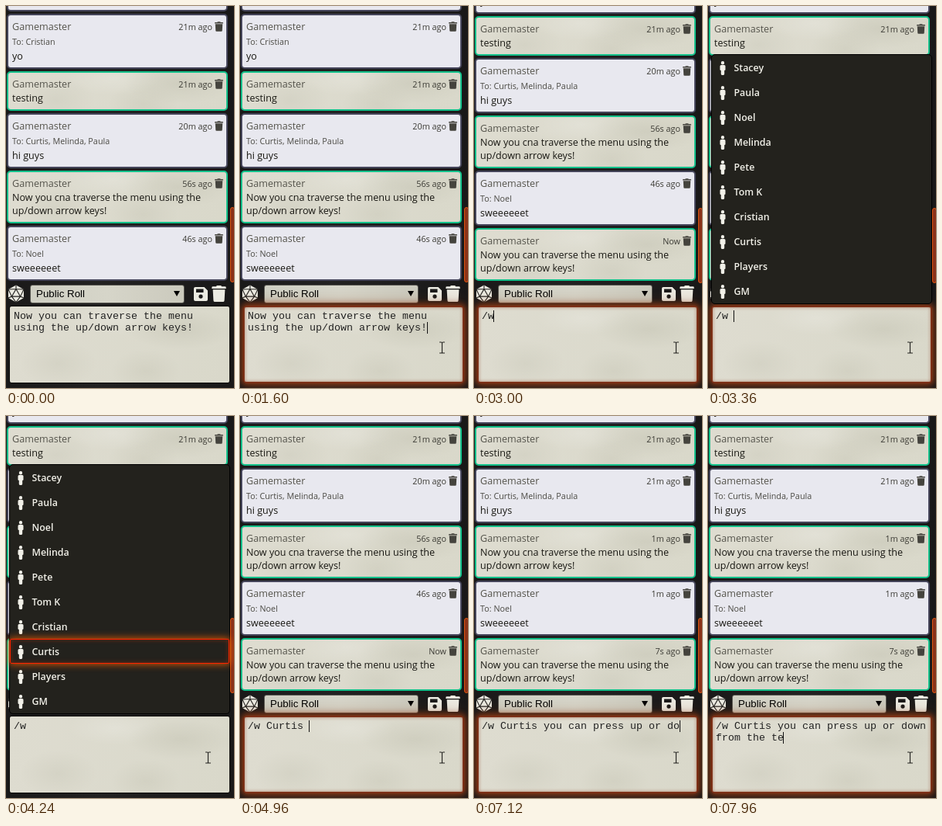
Recreate the animation shown at these times as an HTML page. Size 295 px wide and 492 px high, loop 8 s.

```html
<!DOCTYPE html>
<html lang="en">
<head>
<meta charset="utf-8">
<title>Chat whisper menu</title>
<style>
  html, body { margin: 0; width: 100%; height: 100%; overflow: hidden; background: #1c1b1b; }
  #stage { position: relative; width: 295px; height: 492px; overflow: hidden;
    background: linear-gradient(90deg, #1a1919, #222121 40%, #191818);
    font: 12.6px/17px "Open Sans", sans-serif; color: #191813; }
  #stage * { box-sizing: border-box; }
  #stage svg, .abs, .card > * { position: absolute; white-space: pre; }
  .paper { background:
    radial-gradient(ellipse 70px 26px at 78% 30%, #c6c5b588, #c6c5b500),
    radial-gradient(ellipse 50px 30px at 22% 75%, #cbcabb77, #cbcabb00),
    radial-gradient(ellipse 60px 22px at 48% 15%, #e6e5dc99, #e6e5dc00),
    radial-gradient(ellipse 45px 28px at 62% 85%, #c9c8b877, #c9c8b800),
    linear-gradient(100deg, #dedcd0, #d9d8ca); }

  #log { left: 1px; top: 0; width: 286px; height: 354px; overflow: hidden;
    display: flex; flex-direction: column; justify-content: flex-end; gap: 3px; }
  .card { position: relative; flex: none; border: 2px solid #45455a; border-radius: 5px; }
  .card.whisper { background: #e8e8ef; }
  .card.paper { border-color: #12c08a; }
  .card .who { left: 5px; top: 5.6px; color: #55544c; }
  .card .when { right: 18px; top: 5.6px; font-size: 10.8px; color: #3c3b35; }
  .card svg { left: 267px; top: 8px; color: #44433d; }
  .card .to { left: 5px; top: 25.3px; font-size: 10.8px; color: #4b4a44; }
  .card .text { left: 5px; top: 24px; }
  .card.whisper .text { top: 43.6px; }

  #thumb { left: 290px; width: 6px; height: 97px; background: #8a3218; border: 1px solid #e0560f; border-radius: 3px; }
  #select { left: 31px; top: 359px; width: 200px; height: 24px; border: 1px solid #55544e; border-radius: 3px;
    background: linear-gradient(90deg, #cfcfc3, #d6d5c9 50%, #cbcabd);
    font: 13.333px/22px "Liberation Sans", Arial, sans-serif; color: #000; padding-left: 7px; }
  #bar svg { color: #ecebe2; }

  #box { left: 4px; top: 386px; width: 286px; height: 100px; border: 1px solid #0c0b0a; border-radius: 3px; }
  #glow { left: 4px; top: 386px; width: 286px; height: 100px; border: 2px solid #7c2f16; border-radius: 4px;
    box-shadow: 0 0 7px 2px #9a3d14cc, 0 0 18px 2px #8a35106b, inset 0 0 4px #8c3a1c99; }
  .line { left: 9.96px; height: 15px; font: 13.333px/15px "Liberation Mono", "Courier New", monospace; color: #222; }
  #caret { width: 1px; height: 15px; background: #111; }

  #menu { left: 4px; top: 62px; width: 286px; height: 322px; background: #23221d;
    border: 1px solid #000; border-radius: 5px; }
  .row { position: relative; height: 32px; line-height: 31px; padding-left: 27.5px; font-size: 12.4px;
    font-weight: 600; color: #f1f0e8; border: 1px solid transparent; }
  .row svg { left: 9px; top: 7px; }
  .row.on { z-index: 1; border-color: #ff2400; border-radius: 2px;
    box-shadow: 0 0 10px 1px #ff6400cc, inset 0 0 6px #ff3c0055; }
</style>
</head>
<body>
<div id="stage">
  <svg width="0" height="0">
    <symbol id="bin" viewBox="0 0 14 16"><path fill="currentColor" d="M0 2Q0 1 1 1H4.2L5 0H9L9.8 1H13Q14 1 14 2V3H0ZM1 4H13L12.4 14.6Q12.3 16 11 16H3Q1.7 16 1.6 14.6Z"/></symbol>
    <symbol id="person" viewBox="0 0 8 18"><path fill="currentColor" d="M4 0A2 2 0 0 1 4 4.4A2 2 0 0 1 4 0ZM2 5H6Q7.5 5 7.5 6.5V11Q7.5 12 6.2 12V16.6Q6.2 18 5 18H3Q1.8 18 1.8 16.6V12Q.5 12 .5 11V6.5Q.5 5 2 5Z"/></symbol>
  </svg>

  <div id="log" class="abs"></div>
  <div id="thumb" class="abs"></div>

  <div id="bar">
    <svg style="left:2px;top:359px" width="22" height="23" viewBox="-11 -11.5 22 23">
      <path fill="currentColor" d="M0-11L10-5.5V5.5L0 11L-10 5.5V-5.5Z"/>
      <path fill="none" stroke="#22211f" stroke-width="1.1" d="M0-11V-6L-5.6 3.6H5.6L0-6M-10-5.5L0-6L10-5.5L5.6 3.6L10 5.5M-10-5.5L-5.6 3.6L-10 5.5M-5.6 3.6L0 11L5.6 3.6"/>
    </svg>
    <div id="select" class="abs">Public Roll</div>
    <svg style="left:217px;top:367px" width="8" height="7"><path d="M0 0H8L4 7Z"/></svg>
    <svg style="left:243px;top:362px" width="18" height="18">
      <path fill="currentColor" fill-rule="evenodd" d="M2 0H13.5L18 4.5V16Q18 18 16 18H2Q0 18 0 16V2Q0 0 2 0ZM3 2.5V7H12.5V2.5ZM9 9.5A2.6 2.6 0 0 0 9 14.7A2.6 2.6 0 0 0 9 9.5Z"/>
    </svg>
    <svg style="left:266px;top:360px" width="19" height="21"><use href="#bin"/></svg>
  </div>

  <div id="box" class="abs paper"></div>
  <div id="glow" class="abs"></div>
  <div id="line0" class="abs line" style="top:392px"></div>
  <div id="line1" class="abs line" style="top:407px"></div>
  <div id="caret" class="abs"></div>
  <div id="menu" class="abs"></div>
  <svg id="beam" style="left:-4px;top:-8px" width="9" height="16">
    <path fill="none" stroke="#2b2a27" stroke-width="1.2" d="M1 1H3.2Q4.5 1 4.5 2.2Q4.5 1 5.8 1H8M4.5 2V14M1 15H3.2Q4.5 15 4.5 13.8Q4.5 15 5.8 15H8"/>
  </svg>
</div>

<script>
const LOOP = 8000, SEND = 1960, TICK = 5920;
const CHAR = 8.0013, LEFT = 9.964, COLS = 34;
const $ = id => document.getElementById(id);

// age, age after the clock tick, recipients, text
const messages = [
  ['22m ago', '22m ago', 'Noel', 'hey'],
  ['21m ago', '21m ago', 'Cristian', 'yo'],
  ['21m ago', '21m ago', '', 'testing'],
  ['20m ago', '21m ago', 'Curtis, Melinda, Paula', 'hi guys'],
  ['56s ago', '1m ago', '', 'Now you cna traverse the menu using the\nup/down arrow keys!'],
  ['46s ago', '1m ago', 'Noel', 'sweeeeeet'],
  ['Now', '7s ago', '', 'Now you can traverse the menu using the\nup/down arrow keys!']
];
const people = ['Stacey', 'Paula', 'Noel', 'Melinda', 'Pete', 'Tom K', 'Cristian', 'Curtis', 'Players', 'GM'];

const cards = messages.map(([age, , to, text]) => {
  const card = document.createElement('div');
  card.className = 'card ' + (to ? 'whisper' : 'paper');
  card.style.height = 34 + 17 * text.split('\n').length + (to ? 20 : 0) + 'px';
  card.innerHTML = `<span class="who">Gamemaster</span><span class="when">${age}</span>
    <svg width="11" height="13"><use href="#bin"/></svg>` +
    (to ? `<span class="to">To: ${to}</span>` : '') + `<span class="text">${text}</span>`;
  $('log').append(card);
  return card;
});
const ages = cards.map(card => card.querySelector('.when'));

$('menu').innerHTML = people.map(name =>
  `<div class="row"><svg width="8" height="18"><use href="#person"/></svg>${name}</div>`).join('');
const rows = [...$('menu').children];

const sent = 'Now you can traverse the menu using the up/down arrow keys!';
const draft = '/w Curtis you can press up and d';
const final = '/w Curtis you can press up or down from the te';

// time, text, characters typed
const typing = [
  [0, sent, 59], [SEND, '', 0], [2920, draft, 1], [3000, draft, 2], [3360, draft, 3], [4960, draft, 10],
  [5360, draft, 11], [5400, draft, 12], [5440, draft, 14], [5480, draft, 15], [5560, draft, 17], [5600, draft, 18],
  [6160, draft, 19], [6200, draft, 21], [6240, draft, 23], [6320, draft, 25], [6400, draft, 27], [6440, draft, 30], [6520, draft, 32],
  [6800, draft, 30], [6880, final, 27], [6960, final, 28], [7000, final, 30], [7080, final, 32], [7160, final, 34],
  [7360, final, 35], [7400, final, 36], [7440, final, 37], [7520, final, 39], [7560, final, 40],
  [7600, final, 41], [7640, final, 42], [7720, final, 44], [7920, final, 45], [7960, final, 46]
];
const blink = [[0, 0], [760, 1], [1160, 0], [1600, 1], [2400, 0], [2840, 1], [3760, 0], [4960, 1], [6040, 0], [6160, 1]];
const focus = [[0, 0], [760, .5], [800, 1], [4000, 0], [4960, 1]];
const picked = [[0, -1], [4000, 9], [4160, 8], [4240, 7], [4960, -1]];
const pointer = [[0, 258, 520], [360, 258, 479], [440, 259, 462], [480, 260, 449], [560, 261, 440]];

const at = (steps, t) => steps.findLast(step => step[0] <= t);
const show = (el, on) => { el.style.display = on ? '' : 'none'; };

function wrap(text) {
  if (text.length <= COLS + 1) return [text, ''];
  const cut = text.lastIndexOf(' ', COLS);
  return [text.slice(0, cut), text.slice(cut + 1)];
}

function render(t) {
  show(cards[6], t >= SEND);
  $('thumb').style.top = (t < SEND ? 259 : 260) + 'px';
  ages.forEach((el, i) => { el.textContent = messages[i][t < TICK ? 0 : 1]; });

  const [, text, count] = at(typing, t);
  const lines = wrap(text.slice(0, count));
  lines.forEach((line, i) => { $('line' + i).textContent = line; });
  const row = lines[1] ? 1 : 0;
  $('caret').style.left = Math.min(283, Math.floor(LEFT + lines[row].length * CHAR)) + 'px';
  $('caret').style.top = 392 + 15 * row + 'px';
  show($('caret'), at(blink, t)[1]);
  $('glow').style.opacity = at(focus, t)[1];

  show($('menu'), t >= 3360 && t < 4960);
  rows.forEach((el, i) => el.classList.toggle('on', i === at(picked, t)[1]));

  const [, x, y] = at(pointer, t);
  $('beam').style.transform = `translate(${x}px, ${y}px)`;
}

const start = performance.now();
function frame() {
  render((performance.now() - start) % LOOP);
  requestAnimationFrame(frame);
}
frame();
</script>
</body>
</html>
```
